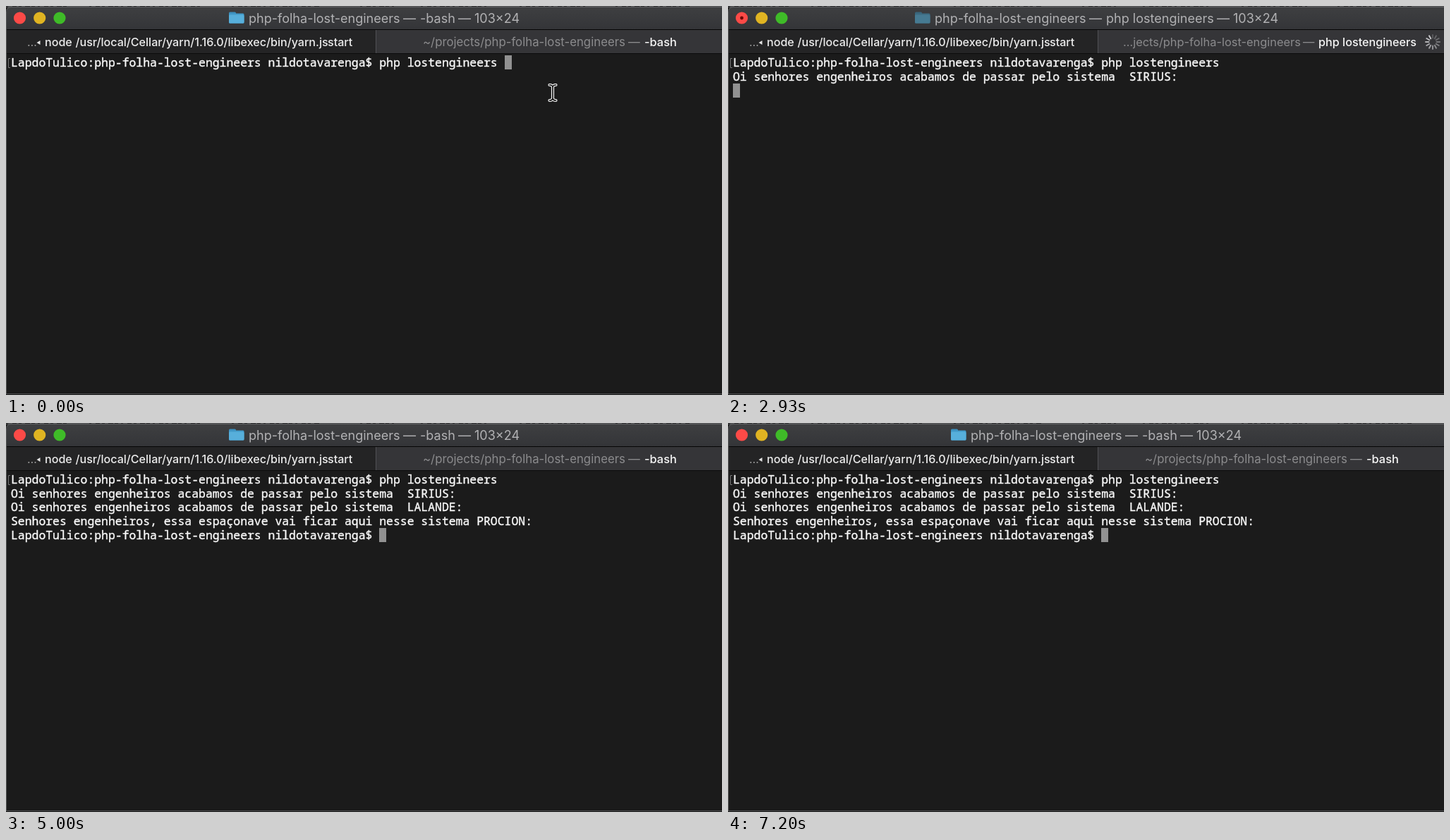
Recreate the animation shown at these times as an HTML page with a canvas. Size 1015 by 552 pixels, loop 7340 ms.

```html
<!DOCTYPE html>
<html lang="pt">
<head>
<meta charset="utf-8">
<title>Terminal</title>
<style>
html, body { margin: 0; width: 100%; height: 100%; overflow: hidden; background: #1b1b1b; }
canvas { display: block; width: 1015px; height: 552px; }
</style>
</head>
<body>
<canvas id="stage" width="1015" height="552"></canvas>
<script>
const ctx = document.getElementById("stage").getContext("2d");
const LOOP = 7340, W = 1015, H = 552;
const COL = 9.86, ROW = 19.7, LEFT = 7, TOP = 70.2;
const UI = "Inter, 'Liberation Sans', sans-serif";
const MONO = "500 16.43px 'Noto Sans Mono', 'DejaVu Sans Mono', monospace";

const PROMPT = "LapdoTulico:php-folha-lost-engineers nildotavarenga$ ";
const COMMAND = "php lostengineers ";
const PASSED = "Oi senhores engenheiros acabamos de passar pelo sistema  ";

// when each thing happens, in ms
const ENTER = 2070, BUSY = 2200, SPIN = 2600, DONE = 4330;
const OUTPUT = [
  [2200, PASSED + "SIRIUS:"],
  [3200, PASSED + "LALANDE:"],
  [4200, "Senhores engenheiros, essa espaçonave vai ficar aqui nesse sistema PROCION:"],
  [4200, PROMPT]
];

function rect(x, y, w, h, fill) {
  ctx.fillStyle = fill;
  ctx.fillRect(x, y, w, h);
}

function disc(x, y, r, fill) {
  ctx.beginPath();
  ctx.arc(x, y, r, 0, Math.PI * 2);
  ctx.fillStyle = fill;
  ctx.fill();
}

function roundRect(x, y, w, h, r, fill) {
  ctx.beginPath();
  ctx.roundRect(x, y, w, h, r);
  ctx.fillStyle = fill;
  ctx.fill();
}

function shade(y0, y1, a, b) {
  const g = ctx.createLinearGradient(0, y0, 0, y1);
  g.addColorStop(0, a);
  g.addColorStop(1, b);
  return g;
}

// words: alternating x and text
function words(list, y, size, fill, weight = 400) {
  ctx.font = `${weight} ${size}px ${UI}`;
  ctx.fillStyle = fill;
  for (let i = 0; i < list.length; i += 2) ctx.fillText(list[i + 1], list[i], y);
}

function drawFrame() {
  rect(0, 0, W, H, "#1b1b1b");

  // sliver of the window behind
  rect(0, 0, W, 2, "#4d4e50");
  const marks = [[0, 85], [118, 160], [320, 125], [502, 52], [588, 98], [728, 98], [864, 100]];
  for (const [x, w] of marks)
    for (let i = 0; i < w; i += 9) rect(x + i, 0, 3 + (i * 7) % 5, 1, "#232325");

  roundRect(0, 1, W + 12, 34, [7, 0, 0, 0], "#616264");
  roundRect(0, 2, W + 12, 32, [7, 0, 0, 0], shade(2, 33, "#3e3f41", "#343538"));

  rect(0, 33, W, 1, "#060606");
  rect(0, 34, 524, 33, "#242425");
  rect(524, 34, W - 524, 33, "#353538");
  rect(524, 34, 1, 33, "#515154");
  rect(0, 67, W, 1, "#0b0b0b");

  rect(0, 8, 1, 542, "#555657");
  rect(0, 550, W, 1, "#555657");
  rect(0, 551, W, 1, "#151515");
}

function drawFolder(x, busy) {
  roundRect(x, 8.5, 10, 6, 1.5, busy ? "#38657b" : "#3b8fbd");
  roundRect(x, 10.5, 21.5, 14, 1.5, busy ? "#3d6b81" : "#429ac9");
  roundRect(x, 12.5, 21.5, 12, 1.5, busy ? "#467a92" : "#57afdb");
}

function drawBars(busy) {
  disc(19.5, 17, 8.6, "#fc4a47");
  disc(47.7, 17, 8.6, "#e0b422");
  disc(76, 17, 8.6, "#3fbb28");
  if (busy) disc(19.5, 17, 2.4, "#6d0806");

  drawFolder(busy ? 265 : 316, busy);
  const title = busy
    ? [293, "php-folha-lost-engineers", 512, "—", 536, "php lostengineers", 693, "—", 716, "103×24"]
    : [344, "php-folha-lost-engineers", 563, "—", 587, "-bash", 641, "—", 664, "103×24"];
  words(title, 24, 18.05, "#b2b2b4");

  words([30, "…"], 57, 16, "#a0a0a0");
  ctx.beginPath();
  ctx.moveTo(43.5, 52);
  ctx.lineTo(48.5, 49);
  ctx.lineTo(48.5, 55);
  ctx.fillStyle = "#e4e4e4";
  ctx.fill();
  words([55, "node", 98.5, "/usr/local/Cellar/yarn/1.16.0/libexec/bin/yarn.js", 456, "start"], 57, 16.1, "#ececec", 500);

  if (busy) {
    words([560, "…jects/php-folha-lost-engineers", 815, "—"], 57, 16.4, "#8b8b8d");
    words([837, "php lostengineers"], 57, 16.2, "#f6f6f6", 500);
  } else {
    words([591, "~/projects/php-folha-lost-engineers", 882, "—"], 57, 16.8, "#8b8b8d");
    words([905, "-bash"], 57, 16.4, "#f6f6f6", 500);
  }
}

function drawSpinner(t) {
  const head = Math.floor(t / 1000 * 12);
  ctx.lineWidth = 2;
  ctx.lineCap = "round";
  for (let i = 0; i < 12; i++) {
    const age = ((head - i) % 12 + 12) % 12;
    const a = i * Math.PI / 6 - Math.PI / 2;
    const c = Math.cos(a), s = Math.sin(a);
    ctx.strokeStyle = `rgba(215,215,218,${0.9 - age * 0.062})`;
    ctx.beginPath();
    ctx.moveTo(999 + c * 5.5, 51 + s * 5.5);
    ctx.lineTo(999 + c * 10, 51 + s * 10);
    ctx.stroke();
  }
}

function drawText(t) {
  const lines = [PROMPT + COMMAND];
  for (const [at, text] of OUTPUT) if (t >= at) lines.push(text);
  if (t >= ENTER && t < 4200) lines.push("");

  const last = lines.length - 1;
  const x = Math.round(LEFT + lines[last].length * COL - 0.4);
  rect(x, Math.round(TOP + last * ROW), 10, 20, "#919191");

  // a hairline outline gives the terminal face its weight
  ctx.font = MONO;
  ctx.fillStyle = ctx.strokeStyle = "#f8f8f8";
  ctx.lineWidth = 0.4;
  ctx.lineJoin = "round";
  lines.forEach((line, i) => {
    ctx.fillText(line, LEFT, 86 + i * ROW);
    ctx.strokeText(line, LEFT, 86 + i * ROW);
  });

  ctx.strokeStyle = "#777";
  ctx.lineWidth = 1;
  ctx.lineCap = "butt";
  ctx.beginPath();
  ctx.moveTo(6, 74.5);
  ctx.lineTo(3.5, 74.5);
  ctx.lineTo(3.5, 87.5);
  ctx.lineTo(6, 87.5);
  ctx.stroke();
}

function drawBeam(x, y) {
  const p = new Path2D("M-4.5 -11 Q-.5 -11 0 -8 Q.5 -11 4.5 -11 M0 -8 V8 M-4.5 11 Q-.5 11 0 8 Q.5 11 4.5 11");
  ctx.save();
  ctx.translate(x, y);
  ctx.lineCap = "round";
  ctx.strokeStyle = "#f2f2f2";
  ctx.lineWidth = 4.2;
  ctx.stroke(p);
  ctx.strokeStyle = "#111";
  ctx.lineWidth = 1.7;
  ctx.stroke(p);
  ctx.restore();
}

function drawArrow(x, y) {
  const p = new Path2D("M0 0 V20.5 L4.6 16.4 L8 24.5 L11.6 23 L8.3 15.2 H14.6 Z");
  ctx.save();
  ctx.translate(x, y);
  ctx.lineJoin = "miter";
  ctx.lineWidth = 1.8;
  ctx.fillStyle = "#0c0c0c";
  ctx.strokeStyle = "#f5f5f5";
  ctx.fill(p);
  ctx.stroke(p);
  ctx.restore();
}

const ease = k => k * k * (3 - 2 * k);
const mix = (a, b, k) => a + (b - a) * k;

function drawPointer(t) {
  if (t < ENTER) return drawBeam(775, 123);
  if (t < 5070 || t >= 6600) return;
  const came = ease(Math.min(1, (t - 5070) / 520));
  const left = Math.max(0, (t - 6380) / 200);
  const x = mix(770, 665, came) - 17 * left;
  const y = mix(121, 15.5, came) - 44 * left * left;
  if (y > 67) drawBeam(x, y);
  else drawArrow(x, y);
}

function draw(t) {
  const busy = t >= BUSY && t < DONE;
  drawFrame();
  drawBars(busy);
  if (busy && t >= SPIN) drawSpinner(t);
  drawText(t);
  drawPointer(Math.floor(t * 0.015 + 0.06) / 0.015);
}

const start = performance.now();
function tick(now) {
  draw(Math.max(0, now - start) % LOOP);
  requestAnimationFrame(tick);
}
draw(0);
requestAnimationFrame(tick);
</script>
</body>
</html>
```
